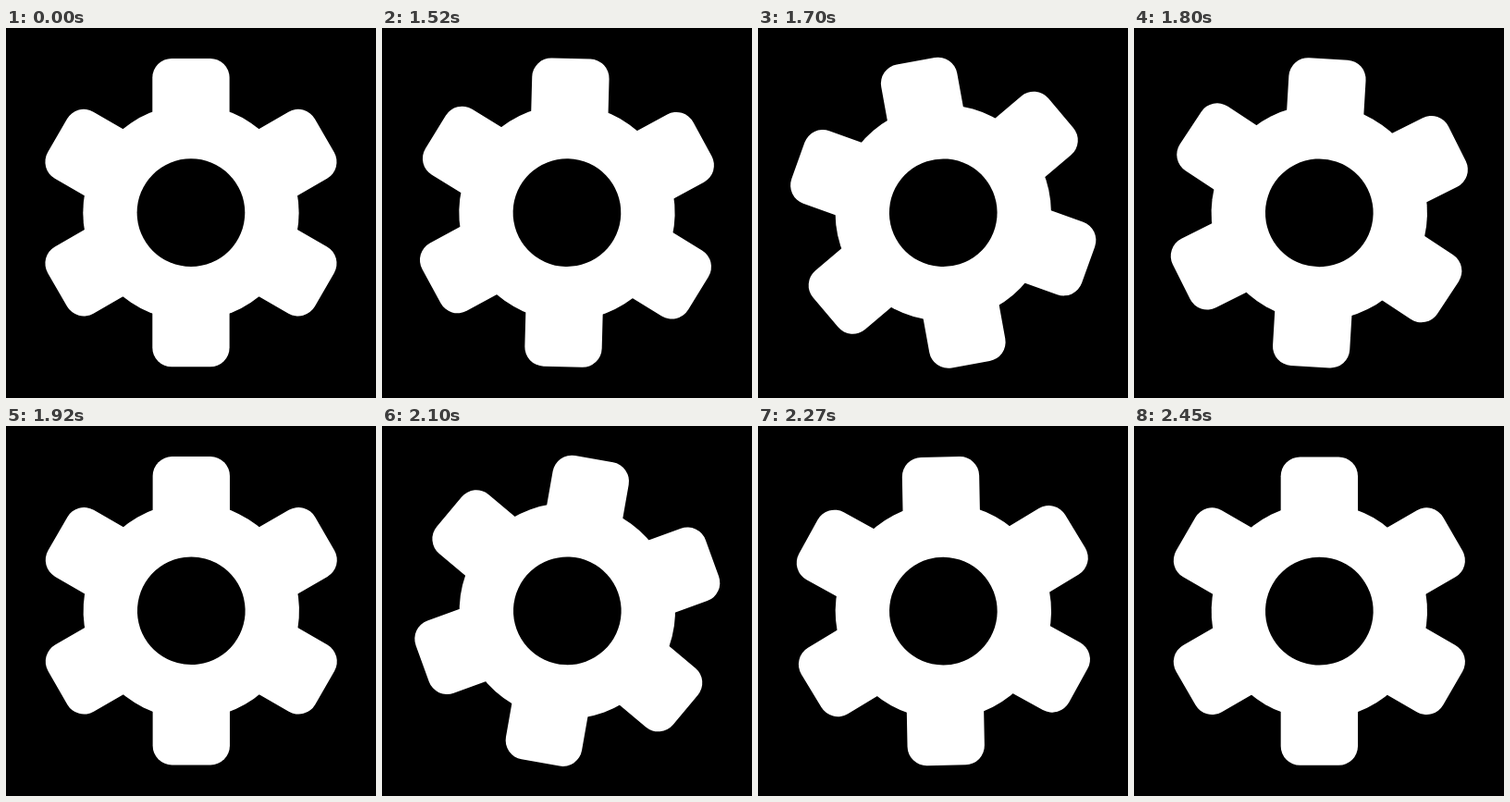
An HTML page for the animation above (2520 ms loop, 400 by 400 pixels).

```html
<!DOCTYPE html>
<html lang="en">
<head>
<meta charset="utf-8">
<title>Turning gear</title>
<style>
  html, body { margin: 0; width: 100%; height: 100%; overflow: hidden; background: #000; }
  svg { display: block; width: 100%; height: 100%; }
</style>
</head>
<body>
<svg viewBox="-12 -12 24 24">
  <defs>
    <rect id="bar" x="-2.5" y="-10" width="5" height="20" rx="1.25"/>
  </defs>
  <g id="gear" fill="#fff">
    <!-- the gear sits slightly above its pivot -->
    <g transform="translate(-.003 -.022)">
      <use href="#bar"/>
      <use href="#bar" transform="rotate(60)"/>
      <use href="#bar" transform="rotate(120)"/>
      <circle r="7"/>
      <circle r="3.5" fill="#000"/>
    </g>
  </g>
</svg>
<script>
  const LOOP = 2520;
  const TICK = 25;
  const TURN_STARTS = [60, 81]; // in ticks

  // One turn of 60 degrees with overshoot: [tick, angle, speed]
  const TURN = [
    [0, 0, 0.8], [1, 1.55, 2.4], [3, 10, 6.8], [5, 29.2, 9.2],
    [7, 44, 6], [12, 63.4, 0.8], [17, 60, 0]
  ];

  const gear = document.getElementById('gear');

  function hermite([t0, a0, v0], [t1, a1, v1], t) {
    const d = t1 - t0, u = (t - t0) / d, w = 1 - u;
    return w * w * ((1 + 2 * u) * a0 + u * d * v0)
         + u * u * ((1 + 2 * w) * a1 - w * d * v1);
  }

  function turnAngle(tick) {
    if (tick <= 0) return 0;
    const i = TURN.findIndex(p => tick <= p[0]);
    return i < 0 ? 60 : hermite(TURN[i - 1], TURN[i], tick);
  }

  // Ticks of 25 ms land on a 10 ms grid
  const tickAt = ms => Math.floor((Math.floor(ms / 10) * 10 + 5) / TICK);

  function draw() {
    const tick = tickAt(performance.now() % LOOP);
    const angle = TURN_STARTS.reduce((sum, start) => sum + turnAngle(tick - start), 0);
    gear.setAttribute('transform', `rotate(${angle})`);
    requestAnimationFrame(draw);
  }
  draw();
</script>
</body>
</html>
```
